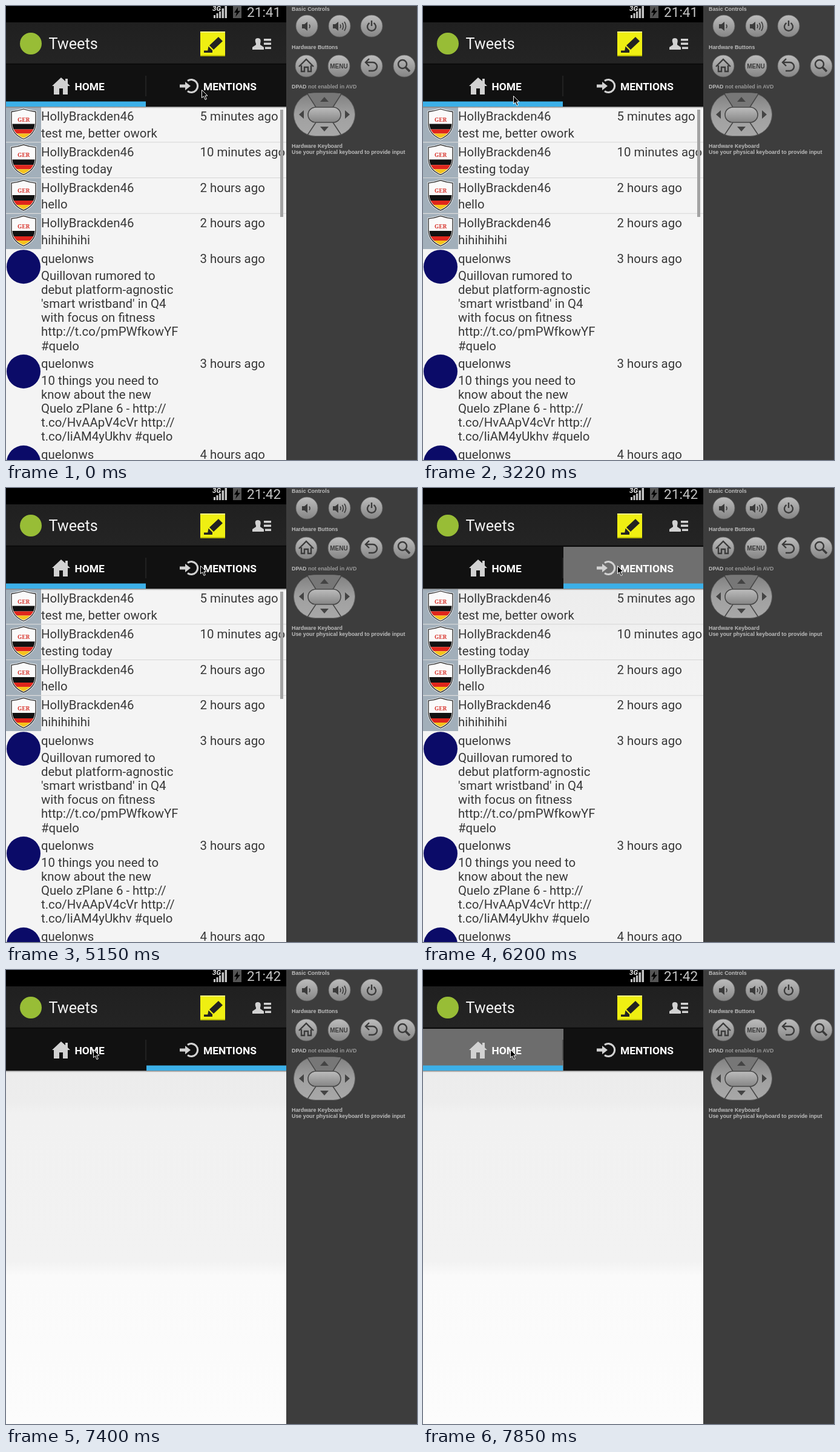
An HTML page for the animation above (8000 ms loop, 679 by 749 pixels).

```html
<!DOCTYPE html>
<html lang="en">
<head>
<meta charset="utf-8">
<title>Tab switching</title>
<style>
  html, body { margin: 0; width: 100%; height: 100%; overflow: hidden; background: #3d3d3d; }
  svg { display: block; width: 679px; height: 749px; }
  text { font-family: Roboto, sans-serif; white-space: pre; }
  .list text { font-size: 20.4px; fill: #383838; }
  .tab { font-size: 17.4px; font-weight: 700; fill: #fff; }
  .panel text { font: 700 8.9px "Liberation Sans", Arial, sans-serif; fill: #bcbcbc; }
</style>
</head>
<body>
<svg viewBox="0 0 679 749">
  <defs>
    <linearGradient id="empty" x2="0" y2="1">
      <stop offset="0" stop-color="#ececec"/><stop offset=".09" stop-color="#ededed"/>
      <stop offset=".12" stop-color="#f1f1f1"/><stop offset=".54" stop-color="#f2f2f2"/>
      <stop offset=".58" stop-color="#fafafa"/><stop offset="1" stop-color="#fcfcfc"/>
    </linearGradient>
    <linearGradient id="upper" x2="0" y2="1">
      <stop offset="0" stop-color="#ededed"/><stop offset=".3" stop-color="#eeeeee"/>
      <stop offset=".4" stop-color="#f1f1f1"/><stop offset="1" stop-color="#f3f3f3"/>
    </linearGradient>
    <linearGradient id="bar" x2="0" y2="1">
      <stop offset="0" stop-color="#202020"/><stop offset="1" stop-color="#242424"/>
    </linearGradient>
    <linearGradient id="shade" x2="0" y2="1">
      <stop offset="0" stop-color="#555" stop-opacity=".8"/><stop offset="1" stop-color="#999" stop-opacity="0"/>
    </linearGradient>
    <linearGradient id="knob" x2="0" y2="1">
      <stop offset="0" stop-color="#bdbdbd"/><stop offset="1" stop-color="#858585"/>
    </linearGradient>
    <linearGradient id="pad" x2="0" y2="1">
      <stop offset="0" stop-color="#808080"/><stop offset=".5" stop-color="#a0a0a0"/><stop offset="1" stop-color="#a8a8a8"/>
    </linearGradient>
    <path id="shield" d="M9 8Q19 7 29 3.500Q39 7 49 8V28Q48 45 29 53Q10 45 9 28Z"/>
    <clipPath id="crest"><use href="#shield"/></clipPath>
    <clipPath id="phone"><path d="M0 0H463V749H0Z"/></clipPath>
    <g id="avatar">
      <path fill="#a2afba" d="M0 0H58V58H0Z"/>
      <g clip-path="url(#crest)">
        <path fill="#fafafa" d="M0 0H58V58H0Z"/>
        <path fill="#111" d="M0 28H58V37H0Z"/>
        <path fill="#e0261c" d="M0 37H58V44H0Z"/>
        <path fill="#f5c21c" d="M0 44H58V58H0Z"/>
      </g>
      <use href="#shield" fill="none" stroke="#fff" stroke-width="3"/>
      <use href="#shield" fill="none" stroke="#222" stroke-width="1.3"/>
      <text x="29" y="24" text-anchor="middle" style="font:700 9.500px 'Noto Serif',serif;fill:#d8342c">GER</text>
    </g>
  </defs>

  <path fill="#3d3d3d" d="M0 0H679V749H0Z"/>

  <g clip-path="url(#phone)">
    <path fill="url(#empty)" d="M0 166H463V749H0Z"/>
    <g id="list" class="list">
      <path fill="#f4f4f4" d="M0 166H463V749H0Z"/>
      <path id="tint" fill="url(#upper)" d="M0 166H463V348H0Z"/>
      <g id="rows"></g>
      <path id="scrollbar" fill="#a3a3a3" d="M453 171H458V348H453Z"/>
    </g>
    <path fill="url(#shade)" d="M0 166H463V169H0Z"/>

    <path fill="#000" d="M0 0H463V27H0Z"/>
    <path fill="url(#bar)" d="M0 27H463V94.500H0Z"/>
    <path fill="#0b0b0b" d="M0 94.500H463V97H0Z"/>
    <path id="homeBg" fill="#111" d="M0 97H232V166H0Z"/>
    <path id="mentionsBg" fill="#111" d="M232 97H463V166H232Z"/>
    <path fill="#333" d="M230.500 115H231.500V149H230.500Z"/>
    <path id="marker" fill="#3cb0e8" d="M0 157.500H231V166H0Z"/>

    <!-- status bar -->
    <g fill="#c4c4c4">
      <path d="M343 20V15H346V20ZM347.500 20V12H350.500V20ZM352 20V9H355V20ZM356.500 20V4H360V20ZM361.500 20V0H365V20Z"/>
      <text x="341" y="8" font-size="11.500" font-weight="700" font-style="italic" fill="#eee">3G</text>
      <text id="clock" x="398" y="18" font-size="22.600">21:41</text>
    </g>
    <path fill="#555" d="M375 0H389V20H375Z"/>
    <path fill="#050505" d="M383 2L377 11H381L379 18L387 8H383Z"/>

    <!-- action bar -->
    <circle cx="41" cy="62" r="18" fill="#98bd36"/>
    <text x="70.500" y="71" font-size="25.200" fill="#f3f3f3">Tweets</text>
    <rect x="321" y="42" width="41" height="41" rx="1.500" fill="#efef12"/>
    <path fill="#fafa80" d="M321 42H362V44H321Z"/>
    <path fill="#b9b900" d="M321 81H362V83H321Z"/>
    <path fill="#222" d="M336 65L351 51L358 58L343 72ZM334.500 66.500L341.500 73.500L333 75ZM327 73.500H341V77H327Z"/>
    <g fill="#d2d2d2">
      <path d="M416 53C421 53 421.500 57 420 62V64L426 68V72H407V68L413 64V62C411 57 411 53 416 53ZM426 54H438V57.500H426ZM426 60.500H438V64H426ZM428 67.500H438V71H428Z"/>
      <!-- tab icons -->
      <path d="M91 118L98 124V120H102V128L106 132H102V146H94V136H88V146H79V132H76Z"/>
      <path d="M287 129.500H296V125L305 132L296 139V134.500H287Z"/>
    </g>
    <path fill="none" stroke="#d2d2d2" stroke-width="3.200" d="M300 123.500A10.500 10.500 0 1 1 300 140.500"/>
    <text class="tab" x="113.500" y="138.500">HOME</text>
    <text class="tab" x="326" y="138.500">MENTIONS</text>
  </g>

  <g class="panel">
    <text x="472" y="8">Basic Controls</text>
    <text x="472" y="71">Hardware Buttons</text>
    <text x="472" y="136">DPAD <tspan fill="#999">not enabled in AVD</tspan></text>
    <text x="472" y="233.500">Hardware Keyboard</text>
    <text x="472" y="244">Use your physical keyboard to provide input</text>
    <g id="knobs"></g>
    <g fill="#3b3b3b">
      <path id="speaker" d="M489 30H493L498 26V41L493 37H489Z"/>
      <use href="#speaker" x="51"/>
    </g>
    <g fill="none" stroke="#3b3b3b" stroke-width="2.400">
      <path stroke-width="1.600" d="M501 30.500Q503 33.500 501 36.500M552 30.500Q554 33.500 552 36.500M555.500 28Q559 33.500 555.500 39M559 26Q564 33.500 559 41"/>
      <path d="M600.500 28A7 7 0 1 0 607.500 28M604 24V33"/>
      <path d="M484 100L496 88L508 100M488 98V108H493V101H499V108H504V98"/>
      <path d="M600 87L594 93L600 99M595 93H606A6.500 6.500 0 0 1 606 107H599"/>
      <circle cx="655" cy="96" r="7"/><path stroke-width="3.500" d="M660 101L667 108"/>
    </g>
    <text x="550" y="102.500" text-anchor="middle" style="font-size:10px;fill:#3b3b3b">MENU</text>
    <rect x="475.500" y="143.500" width="101" height="71" rx="36" fill="url(#pad)" stroke="#6a6a6a"/>
    <path fill="#777" d="M499 144H553L540 167H512Z"/>
    <path stroke="#484848" stroke-width="1.600" d="M498 145L512 167M554 145L540 167M498 213L512 192M554 213L540 192"/>
    <rect x="499" y="167" width="54" height="25" rx="12.500" fill="url(#knob)" stroke="#484848" stroke-width="1.600"/>
    <path fill="#444" d="M526 150L533 158H519ZM526 207L533 199H519ZM484 179L492 172V186ZM568 179L560 172V186Z"/>
  </g>

  <path id="cursor" fill="#000" stroke="#fff" stroke-width="1" stroke-linejoin="round"
    d="M.5 .5V13.500L3.500 10.800L6 16.500L8.300 15.500L5.800 10H10Z"/>
</svg>
<script>
const LOOP = 8000;
const $ = id => document.getElementById(id);
const label = (x, y, s) => `<text x="${x}" y="${y}">${s}</text>`;

const posts = [
  ["HollyBrackden46", "5 minutes ago", "test me, better owork"],
  ["HollyBrackden46", "10 minutes ago", "testing today"],
  ["HollyBrackden46", "2 hours ago", "hello"],
  ["HollyBrackden46", "2 hours ago", "hihihihihi"],
  ["quelonws", "3 hours ago", "Quillovan rumored to", "debut platform-agnostic", "'smart wristband' in Q4",
    "with focus on fitness", "http://t.co/pmPWfkowYF", "#quelo"],
  ["quelonws", "3 hours ago", "10 things you need to", "know about the new", "Quelo zPlane 6 - http://",
    "t.co/HvAApV4cVr http://", "t.co/liAM4yUkhv #quelo"],
  ["quelonws", "4 hours ago"]
];

let nextRow = 166.5;
$("rows").innerHTML = posts.map(([name, age, ...lines], i) => {
  const y = nextRow;
  nextRow += 58.8 + Math.max(0, lines.length - 1) * 22.8;
  return (i < 4 ? `<use href="#avatar" y="${y}"/>` : `<circle cx="29" cy="${y + 28.5}" r="28" fill="#0b0b68"/>`)
    + label(58, y + 22.5, name) + label(320.5, y + 22.5, age)
    + lines.map((s, n) => label(58, y + 50.3 + n * 23.1, s)).join("")
    + (i < 3 ? `<path fill="#d6d6d6" d="M0 ${y + 57.7}h463v1h-463z"/>` : "");
}).join("");

const knobs = [[497, 33], [551, 33], [604, 33], [496, 99], [550, 99], [604, 99], [658, 99]];
$("knobs").innerHTML = knobs.map(([x, y]) =>
  `<circle cx="${x}" cy="${y}" r="18" fill="url(#knob)" stroke="#666" stroke-width=".8"/>`).join("");

// The pointer jumps between sampled positions: [time, x, y].
const pointer = [
  [0, 323, 138], [390, 320, 135], [540, 321, 137],
  [1280, 290, 142], [1430, 195, 151], [1580, 154, 148],
  [3220, 149, 148], [3370, 143, 146], [3520, 138, 142], [3670, 137, 139],
  [3820, 145, 137], [3970, 158, 136], [4110, 166, 135],
  [4560, 195, 133], [4710, 270, 129], [4860, 331, 127], [5000, 326, 128], [5150, 321, 128],
  [6950, 290, 129], [7100, 215, 130], [7250, 160, 130], [7400, 144, 131]
];

const show = (id, on) => $(id).setAttribute("visibility", on ? "inherit" : "hidden");
const paint = (id, colour) => $(id).setAttribute("fill", colour);

function render(t) {
  const [, x, y] = pointer.filter(p => p[0] <= t).pop();
  $("cursor").setAttribute("transform", `translate(${x} ${y})`);
  $("clock").textContent = t < 3670 ? "21:41" : "21:42";

  const mentions = t >= 6200 && t < 7850;
  $("marker").setAttribute("transform", `translate(${mentions ? 232 : 0} 0)`);
  paint("mentionsBg", t >= 6200 && t < 6500 ? "#6f6f6f" : "#111");
  paint("homeBg", t >= 7850 ? "#6d6d6d" : t >= 7700 ? "#444" : "#111");

  show("list", t < 6500);
  show("tint", t >= 6200 && t < 6500);
  show("scrollbar", t < 6200);
}

const start = performance.now();
function tick() {
  render(Math.max(0, performance.now() - start) % LOOP);
  requestAnimationFrame(tick);
}
tick();
</script>
</body>
</html>
```
